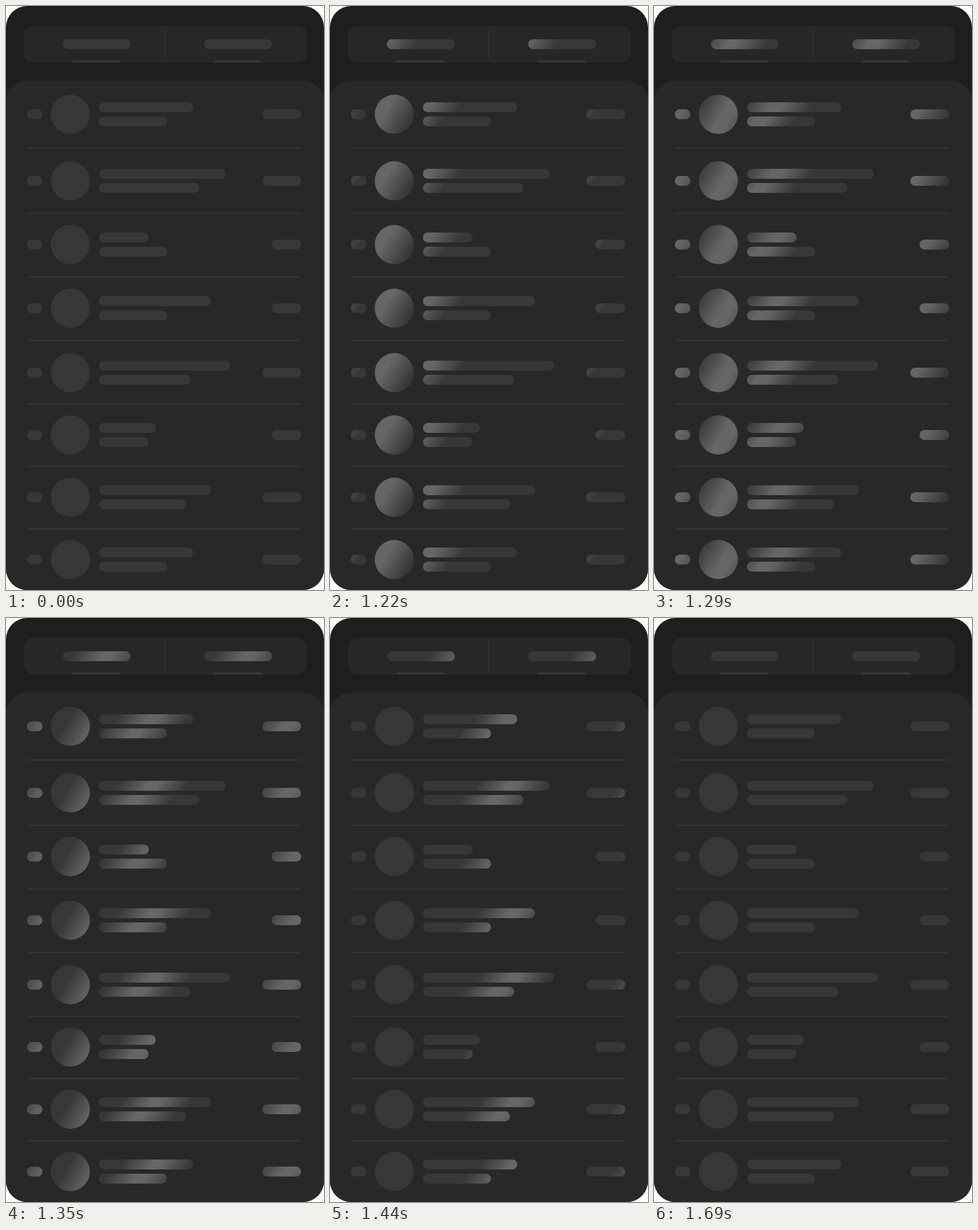
An HTML page with a canvas for the animation above (2220 ms loop, 450 px wide and 825 px high).

```html
<!DOCTYPE html>
<html>
<head>
<meta charset="utf-8">
<style>
  html, body { margin: 0; height: 100%; overflow: hidden; background: #fff; }
  canvas { display: block; }
</style>
</head>
<body>
<canvas id="stage" width="450" height="825"></canvas>
<script>
const ctx = document.getElementById('stage').getContext('2d');
const LOOP = 2220, START = 1190, SWEEP = 500, STEP = 31.5;
const PAGE = '#1e1e1e', CARD = '#282828', BONE = '#373737', GLOW = '#666';
const TILT = 0.6, HALF = 50, LAG = 23, RIGHT = 417.7;

// Lengths of the two placeholder lines in each row
const titles = [133, 179, 70, 158, 185, 80, 158, 133];
const details = [96, 142, 96, 96, 129, 70, 123, 96];
const isShort = i => [2, 3, 5].includes(i);

// Rows sit closer together further down the list
const pitch = i => i === 0 ? 94 : i < 4 ? 90.4 : 88;

function box(x, y, w, h, r, fill) {
  ctx.fillStyle = fill;
  ctx.beginPath();
  ctx.roundRect(x, y, w, h, r);
  ctx.fill();
}

const pill = (x, y, w, fill) => box(x, y - 7, w, 14, 7, fill);

// Slanted light band whose middle crosses height y at x
function band(x, y) {
  const len = 2 * HALF / (1 + TILT * TILT);
  const g = ctx.createLinearGradient(x - HALF, y, x - HALF + len, y + len * TILT);
  g.addColorStop(0, BONE);
  g.addColorStop(0.43, GLOW);
  g.addColorStop(0.57, GLOW);
  g.addColorStop(1, BONE);
  return g;
}

function draw(time) {
  const since = time % LOOP - START;
  const active = since >= 0 && since < SWEEP;
  const s = Math.floor((since + 4) / STEP) * STEP;
  const travel = 0.54 * s + 23 * (1 - Math.exp(-s / 25));
  const shine = (from, speed, y) => active ? band(from + travel * speed, y) : BONE;

  ctx.clearRect(0, 0, 450, 825);
  box(0, 0, 450, 825, 30, PAGE);
  box(25.5, 28, 400.5, 52, 14, '#272727');
  box(224, 34, 1, 40, 0, BONE);
  for (const x of [0, 200]) {
    pill(x + 80.5, 54, 96, shine(x + 40, 0.95, 54));
    box(x + 94, 76.7, 68, 3.3, [3, 3, 0, 0], BONE);
  }

  box(0, 105.5, 450, 719.5, [29, 29, 30, 30], CARD);
  let top = 153;
  titles.forEach((title, i) => {
    const y = Math.floor(top);
    const right = RIGHT - (isShort(i) ? 42 : 55);
    const light = 100 + i;
    pill(29.5, y, 22, shine(-40, 0.93, y));
    box(63.3, y - 27.7, 55.4, 55.4, 27.7, shine(41, 0.85, y));
    pill(131.5, y - 10, title + 0.5, shine(light, 0.98, y - 10));
    pill(131.5, y + 10, details[i] + 0.3, shine(light - LAG, 0.98, y + 10));
    pill(right, y, RIGHT - right, shine(right - 72, 1, y));

    if (i < titles.length - 1) box(29.5, y + pitch(i) / 2 - 0.2, 388, 1.6, 0, BONE);
    top += pitch(i);
  });
}

const begin = performance.now();
function tick() {
  draw(performance.now() - begin);
  requestAnimationFrame(tick);
}
tick();
</script>
</body>
</html>
```
